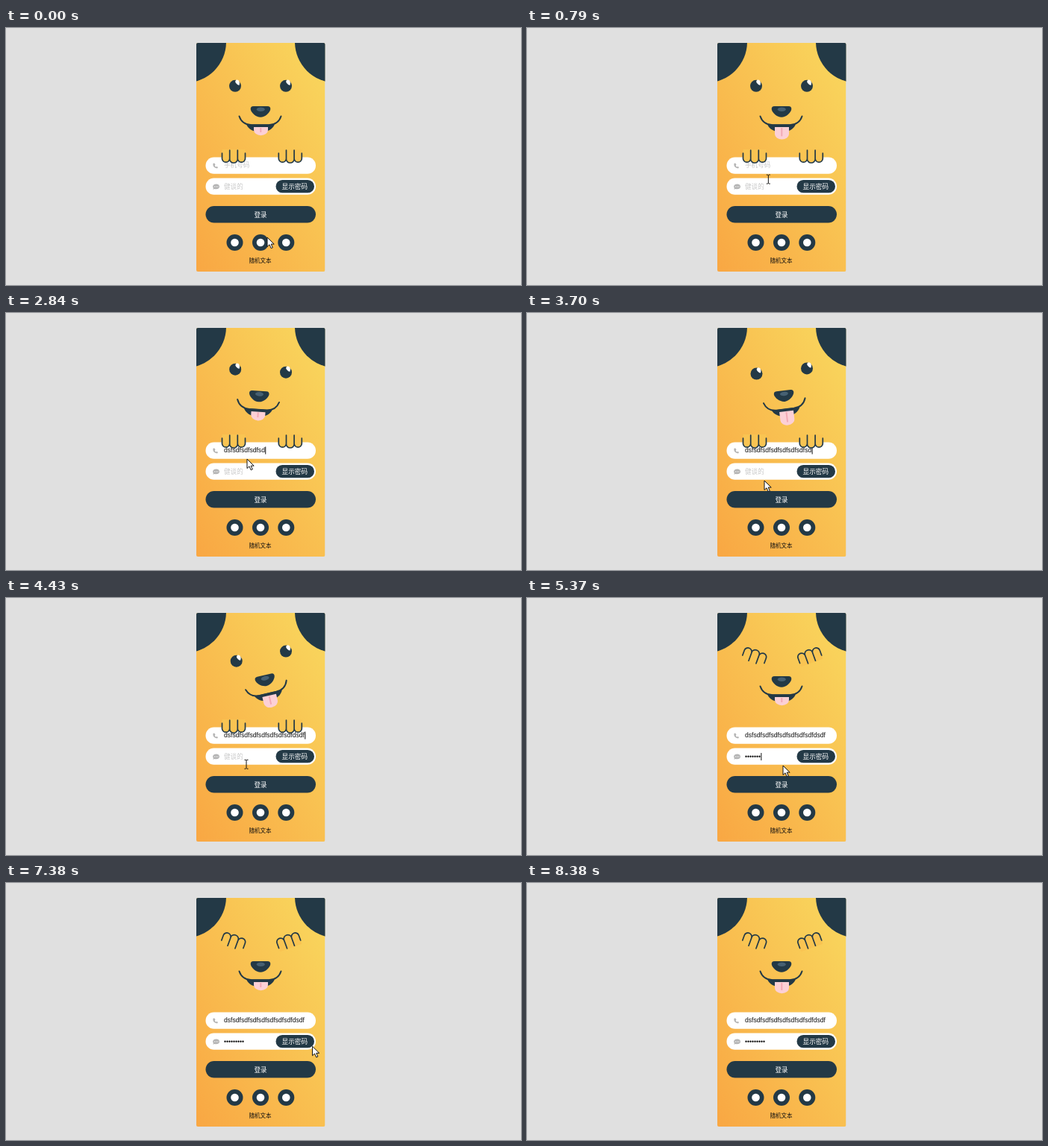
Write an HTML page that moves like this. It is 690x345 px and loops after 8.48 s.

```html
<!DOCTYPE html>
<html lang="zh">
<head>
<meta charset="utf-8">
<title>Dog login</title>
<style>
  html, body { margin: 0; width: 100%; height: 100%; overflow: hidden; background: #e0e0e0; }
  svg { display: block; width: 690px; height: 345px; }
  text { font: 8.6px "Liberation Sans", "Noto Sans CJK SC", "Noto Sans CJK", sans-serif; fill: #111; white-space: pre; }
  .hint { fill: #c9c9c9; }
  .label { fill: #fff; text-anchor: middle; font-weight: 500; }
  .dark { fill: #233946; }
  .line { fill: none; stroke: #233946; stroke-width: 2; stroke-linecap: round; stroke-linejoin: round; }
  .thin { stroke-width: 1.7; }
  .icon { fill: #b4b4b4; }
</style>
</head>
<body>
<svg viewBox="0 0 690 345">
  <defs>
    <linearGradient id="gold" x1="0" y1="1" x2="1" y2="0">
      <stop offset="0" stop-color="#f9a743"/>
      <stop offset="1" stop-color="#f9d85e"/>
    </linearGradient>
    <clipPath id="card"><rect x="255" y="20" width="172.5" height="307" rx="2"/></clipPath>
    <clipPath id="iris"><circle r="8"/></clipPath>
    <clipPath id="entry"><rect x="290" y="174" width="112" height="50"/></clipPath>
    <g id="eye">
      <circle r="8" class="dark"/>
      <ellipse cx="4" cy="-4.6" rx="4.2" ry="2.7" transform="rotate(40 4 -4.6)" fill="#fff" clip-path="url(#iris)"/>
    </g>
    <g id="paw">
      <path d="M-15.5-9V3.200a5.100 5 0 0 0 10.200 0V4.500a5.300 4.600 0 0 0 10.600 0V3.200a5.100 5 0 0 0 10.200 0V-9z" fill="#f9c452"/>
      <path d="M-15.500-4V3.200a5.100 5 0 0 0 10.200 0V-8M-5.300 3V4.200a5.300 4.800 0 0 0 10.600 0V-8M5.300 3.200a5.100 5 0 0 0 10.200 0V-4" class="line thin"/>
    </g>
  </defs>

  <g clip-path="url(#card)">
    <rect x="255" y="20" width="172.500" height="307" fill="url(#gold)"/>
    <circle cx="240" cy="18.500" r="55" class="dark"/>
    <circle cx="442" cy="18.500" r="55" class="dark"/>
  </g>

  <use id="eyeL" href="#eye"/>
  <use id="eyeR" href="#eye"/>
  <g id="snout">
    <path d="M312.5 118.5C315 126 321 130 329 130.2H352C360 130 366 126 368.5 118.5" class="line"/>
    <path d="M322 129.5H360C357 136 351 139.5 341 139.5S325 136 322 129.5z" class="dark"/>
    <path id="tongue" fill="#fcd0d6"/>
    <path id="crease" stroke="#f3a9b5" stroke-width="2" fill="none"/>
    <path d="M331.5 105H350.5Q354.5 105 354.3 109C353.5 114 347 119.8 341 119.8S328.5 114 327.7 109Q327.5 105 331.5 105z" class="dark"/>
    <ellipse cx="341.3" cy="109.3" rx="5.5" ry="2.8" fill="#466072"/>
  </g>

  <g fill="#fff">
    <rect x="267.5" y="173.5" width="147.5" height="22.3" rx="11.1"/>
    <rect x="267.5" y="201.5" width="147.5" height="22.3" rx="11.1"/>
  </g>
  <path class="icon" d="M277.3 182.2L279 181.3L280.5 183.6L279.6 184.7Q280.4 186 281.6 186.600L282.700 185.700L284 187.200L282.900 188.500Q277 187.400 277.300 182.200z"/>
  <path class="icon" d="M281.500 209.500c6 0 6 6.800 0 6.800q-1.300 0-2.200-.4l-2 .8.600-1.800c-2-2.600.2-5.400 3.600-5.400z"/>
  <path d="M278.800 213h1.200M281 213h1.200M283.200 213h1.200" stroke="#fff" stroke-width="1.100"/>
  <g clip-path="url(#entry)">
    <text id="phone" x="292" y="187.300"></text>
    <text id="pass" x="292" y="215.500"></text>
    <path id="caret" stroke="#111" stroke-width="1"/>
  </g>

  <rect x="361.500" y="204" width="51.500" height="17.300" rx="8.650" class="dark"/>
  <text x="386.800" y="216" class="label">显示密码</text>
  <rect x="267.500" y="239" width="147.500" height="22.500" rx="11.250" class="dark"/>
  <text x="341" y="253.500" class="label">登录</text>
  <g id="social"></g>
  <text x="340.500" y="314.500" text-anchor="middle" style="font-size:7.500px">随机文本</text>

  <use id="pawL" href="#paw"/>
  <use id="pawR" href="#paw"/>

  <g id="pointer">
    <path id="arrow" d="M0 0V12.500L3 9.800L5.200 14.700L7.300 13.800L5.200 9.100H9.200z" fill="#fff" stroke="#111" stroke-width="1"/>
    <path id="beam" d="M-2.500-6H-.8L0-5.200L.8-6H2.500M0-5.200V5.200M-2.500 6H-.8L0 5.200L.8 6H2.500" fill="none" stroke="#111"/>
  </g>
</svg>
<script>
const LOOP = 8480;
const $ = id => document.getElementById(id);
const set = (id, name, value) => $(id).setAttribute(name, value);
const show = (id, on) => set(id, 'visibility', on ? 'visible' : 'hidden');
const mix = (a, b, k) => a + (b - a) * k;
const smooth = k => k * k * (3 - 2 * k);

const PHONE = 'dsf' + 'sdf'.repeat(7) + 'dsdf';
const PASSWORD = 'dsfsdfsdf';

// Tracks are lists of [time, value, ...].
const pointerTrack = [[0, 350, 281], [120, 350, 281], [840, 323, 202], [1050, 323, 184], [2660, 323, 184],
  [2820, 323, 196], [3460, 318, 215], [3680, 318, 225], [4370, 322, 227], [4550, 322, 213], [4850, 322, 213],
  [5250, 343, 225], [5500, 343, 225], [5950, 397, 212], [7300, 397, 212], [7860, 636, 340]];
const tiltTrack = [[1000, 0], [1300, 16.6], [1750, 16.6], [2840, 4], [3700, -7], [4250, -13], [4600, -13], [4850, 0]];
const phoneTrack = [[1720, 0], [2840, 14.5], [3700, 23.5], [4200, 28]];
const passTrack = [[4850, 0], [5370, 7.3], [5560, 9]];
const raiseTrack = [[4600, 0], [4950, 1]];
const peekTrack = [[6000, 0], [6300, 1], [7060, 1], [7360, 0]];

function sample(track, t, ease = k => k) {
  if (t <= track[0][0]) return track[0].slice(1);
  const i = track.findIndex(key => key[0] > t);
  if (i < 0) return track[track.length - 1].slice(1);
  const a = track[i - 1], b = track[i];
  const k = ease((t - a[0]) / (b[0] - a[0]));
  return a.slice(1).map((v, j) => mix(v, b[j + 1], k));
}

$('social').innerHTML = [306.5, 341, 375.3].map(x =>
  `<circle cx="${x}" cy="288" r="11" class="dark"/><circle cx="${x}" cy="288" r="5.3" fill="#fff"/>`).join('');

function drawFace(t, raise, peek) {
  const [tilt] = sample(tiltTrack, t);
  const covered = raise > 0.9 && peek < 0.25;
  set('eyeL', 'transform', `translate(${307 + 0.01 * tilt * tilt} ${77.8 - 0.53 * tilt})`);
  set('eyeR', 'transform', `translate(375 ${77.8 + 0.48 * tilt})`);
  show('eyeL', !covered);
  show('eyeR', !covered);
  set('snout', 'transform', `translate(${-0.6 * tilt} ${-0.12 * Math.abs(tilt)}) rotate(${tilt} 340.5 118)`);

  const wave = s => 4 * (1 - Math.cos(s * 2 * Math.PI / 2600));
  const calm = 1 - sample([[4550, 0], [4850, 1]], t)[0];
  const reach = t > 7730 ? wave(t - 7730) : wave(t) * calm;
  set('tongue', 'd', `M332 133H351V${137 + reach}A9.5 7.2 0 0 1 332 ${137 + reach}z`);
  set('crease', 'd', `M341.3 134V${140 + reach}`);
}

function drawPaws(raise, peek) {
  const place = (id, x0, x1, side) => set(id, 'transform',
    `translate(${mix(x0, x1, raise)} ${mix(172, 78.5, raise) + 22 * peek}) rotate(${20 * side * raise}) scale(1 ${1 - 2 * raise})`);
  place('pawL', 305, 304.7, 1);
  place('pawR', 380.8, 378.8, -1);
}

function write(id, value, hint) {
  const el = $(id), text = value || hint;
  if (el.textContent !== text) el.textContent = text;
  el.setAttribute('class', value ? '' : 'hint');
}

function drawFields(t) {
  const typed = Math.floor(sample(phoneTrack, t)[0]);
  const secret = Math.floor(sample(passTrack, t)[0]);
  const plain = t >= 6000 && t < 7060;
  write('phone', PHONE.slice(0, typed), '手机号码');
  write('pass', plain ? PASSWORD : '•'.repeat(secret), '健谈的');
  const inPass = t > 4600;
  const filled = inPass ? secret : typed;
  const x = 292.8 + (filled ? $(inPass ? 'pass' : 'phone').getComputedTextLength() : 0);
  const y = inPass ? 208 : 179.5;
  set('caret', 'd', `M${x} ${y}v10`);
  show('caret', filled > 0 && t < 5950);
}

function drawPointer(t) {
  const [x, y] = sample(pointerTrack, t, smooth);
  const overField = x < 362 && ((y > 174 && y < 195.5) || (y > 202 && y < 224));
  set('pointer', 'transform', `translate(${x} ${y})`);
  set('pointer', 'display', t < 7900 ? 'inline' : 'none');
  show('arrow', !overField);
  show('beam', overField);
}

function render(t) {
  const [raise] = sample(raiseTrack, t, smooth);
  const [peek] = sample(peekTrack, t, smooth);
  drawFace(t, raise, peek);
  drawPaws(raise, peek);
  drawFields(t);
  drawPointer(t);
}

const start = performance.now();
function tick() {
  render((performance.now() - start) % LOOP);
  requestAnimationFrame(tick);
}
tick();
</script>
</body>
</html>
```
